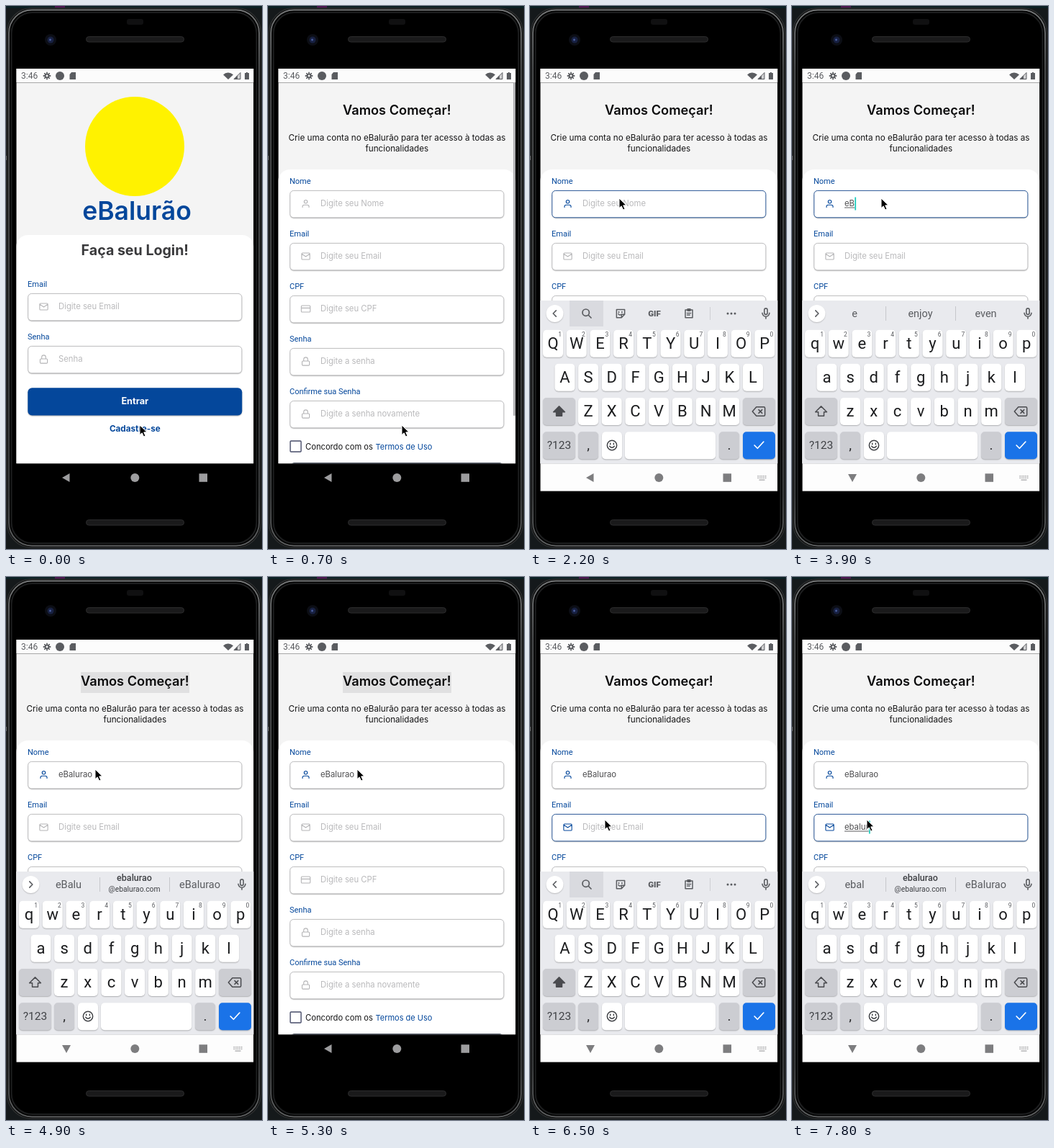
An HTML page with a canvas that plays this animation: 356x754 px, repeating every 8 s.

```html
<!DOCTYPE html>
<html lang="pt-BR">
<head>
<meta charset="utf-8">
<title>Cadastro</title>
<style>
html, body { margin: 0; width: 100%; height: 100%; overflow: hidden; background: #000; }
canvas { display: block; width: 356px; height: 754px; }
</style>
</head>
<body>
<canvas id="stage" width="356" height="754"></canvas>
<script>
const ctx = document.getElementById('stage').getContext('2d');
const LOOP = 8000, STEP = 100;
const BLUE = '#04479b', GREY = '#5a5c60', PALE = '#f4f4f4';
const INTER = 'Inter, sans-serif', ROBOTO = 'Roboto, sans-serif';
const APP = 'eBalurão';

// Screen edges; forms keep a 16 px margin
const LEFT = 14.3, WIDTH = 330, TOP = 106.2, NAV = 635.3, BOTTOM = 673.8, KB_TOP = 409;
const INSET = LEFT + 16, INNER = WIDTH - 32;

const ICONS = {
  user: 'M20 21v-2a4 4 0 0 0-4-4H8a4 4 0 0 0-4 4v2M8 7a4 4 0 1 0 8 0a4 4 0 1 0-8 0',
  mail: 'M4 4h16a2 2 0 0 1 2 2v12a2 2 0 0 1-2 2H4a2 2 0 0 1-2-2V6a2 2 0 0 1 2-2zM22 6l-10 7L2 6',
  card: 'M3 4h18a2 2 0 0 1 2 2v12a2 2 0 0 1-2 2H3a2 2 0 0 1-2-2V6a2 2 0 0 1 2-2zM1 10h22',
  lock: 'M5 11h14a2 2 0 0 1 2 2v7a2 2 0 0 1-2 2H5a2 2 0 0 1-2-2v-7a2 2 0 0 1 2-2zM7 11V7a5 5 0 0 1 10 0v4',
  search: 'M3 10a7 7 0 1 0 14 0a7 7 0 1 0-14 0M21 21l-6-6',
  sticker: 'M3 3h18v11l-7 7H3zM14 21v-7h7M8 8v2M15 8v2M7 13q3 4 6 1',
  clip: 'M4 4h16v17H4zM9 2h6v4H9zM8 11h8M8 15h6',
  smile: 'M2 12a10 10 0 1 0 20 0a10 10 0 1 0-20 0M7 14q5 6 10 0M8.5 8v2M15.5 8v2',
  back: 'M21 4H8l-7 8 7 8h13a2 2 0 0 0 2-2V6a2 2 0 0 0-2-2zM18 9l-6 6M12 9l6 6',
  shift: 'M12 3l-10 10h5v7h10v-7h5z',
  left: 'M15 5l-7 7 7 7',
  right: 'M9 5l7 7-7 7',
  check: 'M21 5L9 18l-6-6',
  mic: 'M9 5a3 3 0 0 1 6 0v6a3 3 0 0 1-6 0zM5 11a7 7 0 0 0 14 0M12 18v4',
  gear: 'M7 12a5 5 0 1 0 10 0a5 5 0 1 0-10 0M12 2v4M12 18v4M2 12h4M18 12h4M5 5l3 3M16 16l3 3M19 5l-3 3M8 16l-3 3'
};
for (const name in ICONS) ICONS[name] = new Path2D(ICONS[name]);

function rect(x, y, w, h, color) {
  ctx.fillStyle = color;
  ctx.fillRect(x, y, w, h);
}

function round(x, y, w, h, r, fill, stroke, lw = 1) {
  ctx.beginPath();
  ctx.roundRect(x, y, w, h, r);
  if (fill) { ctx.fillStyle = fill; ctx.fill(); }
  if (stroke) { ctx.strokeStyle = stroke; ctx.lineWidth = lw; ctx.stroke(); }
}

function disc(x, y, r, color) {
  ctx.beginPath();
  ctx.arc(x, y, r, 0, 7);
  ctx.fillStyle = color;
  ctx.fill();
}

function poly(points, fill, stroke) {
  ctx.beginPath();
  for (let i = 0; i < points.length; i += 2) ctx.lineTo(points[i], points[i + 1]);
  ctx.closePath();
  ctx.fillStyle = fill;
  ctx.fill();
  if (stroke) { ctx.strokeStyle = stroke; ctx.lineWidth = 1; ctx.stroke(); }
}

function text(str, x, y, font, color, align = 'left') {
  ctx.font = font;
  ctx.fillStyle = color;
  ctx.textAlign = align;
  ctx.fillText(str, x, y);
}

function icon(name, x, y, size, color, lw = 1.1, solid) {
  const k = size / 24;
  ctx.save();
  ctx.translate(x - size / 2, y - size / 2);
  ctx.scale(k, k);
  ctx.strokeStyle = ctx.fillStyle = color;
  ctx.lineWidth = lw / k;
  ctx.lineJoin = ctx.lineCap = 'round';
  if (solid) ctx.fill(ICONS[name]);
  ctx.stroke(ICONS[name]);
  ctx.restore();
}

function shaded(alpha, draw) {
  ctx.save();
  ctx.shadowColor = `rgba(0,0,0,${alpha})`;
  ctx.shadowBlur = 1.5;
  ctx.shadowOffsetY = 1;
  draw();
  ctx.restore();
}

function clipped(x, y, w, h, draw) {
  ctx.save();
  ctx.beginPath();
  ctx.rect(x, y, w, h);
  ctx.clip();
  draw();
  ctx.restore();
}

// Timeline
const NAME = { word: 'eBalurao', keys: [2800, 3900, 4300, 4400, 4600, 4750, 4800, 4850], from: 1700, to: 4900 };
const MAIL = { word: 'ebalurao', keys: [6900, 7300, 7400, 7500, 7650, 7800], from: 5900, to: LOOP };
const SUGGEST_LAG = 200, KB_HEIGHT = 265;

const clamp = v => Math.max(0, Math.min(1, v));
const smooth = p => p * p * (3 - 2 * p);
const within = (t, a, b) => t >= a && t < b;
const typed = (input, t) => input.word.slice(0, input.keys.filter(k => k <= t).length);
const focused = (input, t) => within(t, input.from, input.to);

function caretOn(input, t) {
  const last = Math.max(input.from, ...input.keys.filter(k => k <= t));
  return (t - last) % 1000 < 500;
}

function keyboardDrop(t) {
  if (t < 4900) return Math.pow(1 - clamp((t - 1880) / 310), 3);
  if (t < 5900) return smooth(clamp((t - 4900) / 200));
  return Math.pow(1 - clamp((t - 5980) / 310), 3);
}

function pointer(t) {
  const a = smooth(clamp((t - 800) / 500)), b = smooth(clamp((t - 5500) / 200));
  return [186 - 62 * a - 20 * b, 582 - 315 * a + 70 * b];
}

// Phone and system bars
function phone() {
  rect(0, 0, 356, 754, '#15191b');
  rect(0, 0, 356, 3, '#0b2024');
  rect(68, 0, 14, 3, '#4b1550');
  rect(0, 208, 4, 6, '#6b6d6e');
  const rim = ctx.createLinearGradient(0, 0, 0, 754);
  rim.addColorStop(0, '#77797a');
  rim.addColorStop(.12, '#4c4e4f');
  rim.addColorStop(.9, '#3e4041');
  rim.addColorStop(1, '#5e6061');
  round(1.5, 3, 353, 749, 34, '#060606', '#2c2e2f', 1.5);
  round(4, 5.5, 348, 744, 32, '#000', rim, 2);
  round(7.5, 9, 341, 737, 29, '#000', '#1d1e1f', 2);
  round(168, 18, 23, 8, 3, '#101011');
  disc(62, 47, 8, '#0c0e15');
  disc(62, 47, 4.5, '#182142');
  disc(61.5, 47, 1.4, '#4a5fa0');
  for (const y of [42, 713]) round(111.5, y + .5, 136, 7.5, 4, '#1a1a1b', '#2c2c2d');
}

function statusBar() {
  rect(LEFT, 87, WIDTH, TOP - 87, '#fcfcfc');
  text('3:46', 21, 101, '12px ' + ROBOTO, GREY);
  icon('gear', 57, 97, 11, GREY, 1.8);
  disc(75, 97, 6, GREY);
  poly([91, 92, 97, 92, 97, 102, 88.5, 102, 88.5, 95], GREY);
  ctx.beginPath();
  ctx.moveTo(309, 102);
  ctx.arc(309, 102, 9.5, -Math.PI * .76, -Math.PI * .24);
  ctx.fillStyle = GREY;
  ctx.fill();
  poly([317, 101.5, 326, 101.5, 326, 92.5], '#d0d0d2', GREY);
  poly([317, 101.5, 322, 101.5, 322, 96.5], GREY);
  rect(332, 93, 6, 9, GREY);
  rect(334, 92, 2, 1, GREY);
}

function navIcons(color, down) {
  poly(down ? [78, 650, 90, 650, 84, 661] : [78, 655, 88.5, 649, 88.5, 661], color);
  disc(179.3, 655, 6, color);
  rect(268.5, 649.3, 11.5, 11.5, color);
}

// Forms
function field(top, label, hint, glyph, input, t) {
  const active = input && focused(input, t);
  const value = input ? typed(input, t) : '';
  const box = [INSET + .4, top + .4, INNER - .8, 37.4, 5];
  text(label, 30, top - 9, '11px ' + ROBOTO, BLUE);
  shaded(.35, () => round(...box, '#fff'));
  round(...box, '#fff', active ? '#2a5796' : '#bcbcbe');
  icon(glyph, 52.5, top + 18.5, 13.5, active || value ? BLUE : '#b4b4b6');
  text(value || hint, 73, top + 22, '11.3px ' + INTER, value ? '#4c4c4e' : '#b9b9bb');
  if (!active) return;
  const end = 73 + (value ? ctx.measureText(value).width : 0);
  if (value) rect(73, top + 23.5, end - 73, 1, '#5c5c5e');
  if (caretOn(input, t)) rect(end + .3, top + 9.5, 1.8, 18, '#1fcbbd');
}

function button(y, label) {
  shaded(.3, () => round(INSET, y, INNER, 38.4, 6, BLUE));
  text(label, 179.3, y + 22.3, '700 12.7px ' + INTER, '#fff', 'center');
}

function login(pressed) {
  rect(LEFT, TOP, WIDTH, NAV - TOP, PALE);
  round(LEFT, 318, WIDTH, 340, 16, '#fff');
  disc(179, 195, 69, '#fff200');
  text(APP, 182, 297, '600 35.5px ' + INTER, BLUE, 'center');
  text('Faça seu Login!', 179.3, 346, '700 19.6px ' + INTER, '#3a3a3c', 'center');
  field(399, 'Email', 'Digite seu Email', 'mail');
  field(472, 'Senha', 'Senha', 'lock');
  button(530.2, 'Entrar');
  ctx.globalAlpha = pressed ? .3 : 1;
  text('Cadastre-se', 179.3, 591, '700 11.7px ' + INTER, BLUE, 'center');
  ctx.globalAlpha = 1;
}

function signup(t) {
  rect(LEFT, TOP, WIDTH, NAV - TOP, PALE);
  round(LEFT, 227, WIDTH, 440, 16, '#fff');
  if (within(t, 4900, 5700)) rect(104, 132, 151, 29, '#e0e0e1');
  text('Vamos Começar!', 179.3, 151.3, '600 18.2px ' + INTER, '#0b0b0c', 'center');
  const font = '11.7px ' + INTER;
  text(`Crie uma conta no ${APP} para ter acesso à todas as`, 179.5, 187, font, '#151516', 'center');
  text('funcionalidades', 179.3, 202, font, '#151516', 'center');
  field(256, 'Nome', 'Digite seu Nome', 'user', NAME, t);
  field(329, 'Email', 'Digite seu Email', 'mail', MAIL, t);
  field(402, 'CPF', 'Digite seu CPF', 'card');
  field(475, 'Senha', 'Digite a senha', 'lock');
  field(548, 'Confirme sua Senha', 'Digite a senha novamente', 'lock');
  round(31, 604, 15, 15, 1, '#fff', '#454b68', 1.4);
  text('Concordo com os', 52, 615.5, '11.2px ' + INTER, '#151516');
  text('Termos de Uso', 149.5, 615.5, '11px ' + INTER, BLUE);
  round(INSET, 634.3, INNER, 38.4, 6, '#0c1626');
  if (t < 1800) round(341, 106, 3, 463, 1, '#b5b5b7');
}

// Keyboard
function key(x, y, w, label, color, ink, size) {
  shaded(.25, () => round(x, y, w, 38, 5, color));
  if (label) text(label, x + w / 2, y + 26 - (22 - size) * .35, size + 'px ' + ROBOTO, ink, 'center');
}

function letters(upper) {
  const rows = [['qwertyuiop', 18], ['asdfghjkl', 34.4], ['zxcvbnm', 67]];
  rows.forEach(([row, x0], r) => [...row].forEach((c, i) => {
    const x = x0 + i * 32.7, y = 449.7 + r * 47.1;
    key(x, y, 28, upper ? c.toUpperCase() : c, '#fff', '#1b1c1e', 22);
    if (!r) text((i + 1) % 10, x + 26, y + 9, '8.5px ' + ROBOTO, GREY, 'right');
  }));
}

function toolbar() {
  rect(55, KB_TOP, 47, 36, '#d9dadf');
  icon('search', 79, 427, 16, GREY, 1.7);
  icon('sticker', 126, 427, 15, GREY, 1.5);
  text('GIF', 173, 431, '900 11.5px ' + ROBOTO, GREY, 'center');
  icon('clip', 221, 427, 15, GREY, 1.5);
  rect(250, 418, 1, 18, '#cfd0d4');
  for (const x of [275, 280, 285]) disc(x, 427, 1.5, GREY);
}

function suggestions(word) {
  const font = '14.5px ' + ROBOTO;
  const known = word.length > 2;
  text(word, 87, 432, font, GREY, 'center');
  if (known) {
    text(MAIL.word, 178.5, 422, '500 12.5px ' + ROBOTO, '#3f4145', 'center');
    text(`@${MAIL.word}.com`, 178.5, 437, '10.3px ' + ROBOTO, '#3f4145', 'center');
  } else {
    text('enjoy', 178.5, 432, font, GREY, 'center');
  }
  text(known ? NAME.word : 'even', 269.5, 432, font, GREY, 'center');
  for (const x of [130, 227]) rect(x, 417, 1, 20, '#c6c7cb');
}

function keyboard(t) {
  const input = t < 5900 ? NAME : MAIL;
  const hint = typed(input, t - SUGGEST_LAG);
  const upper = !typed(input, t) || within(t, 3300, 3900);
  const grey = '#cccdd2', low = 544, base = 591.2;
  rect(LEFT, KB_TOP, WIDTH, NAV - KB_TOP, '#e9eaee');
  rect(LEFT, NAV, WIDTH, BOTTOM - NAV, '#fdfdfd');
  if (hint) suggestions(hint); else toolbar();
  shaded(.2, () => disc(34.5, 427, 12, '#fff'));
  icon(hint ? 'right' : 'left', 34.5, 427, 14, GREY, 1.6);
  icon('mic', 328, 427, 17, GREY, 1.6);
  letters(upper);
  key(18, low, 45, '', grey);
  icon('shift', 40.5, 563, 19, '#4a4b4f', 1.5, upper);
  key(296, low, 45, '', grey);
  icon('back', 318, 563, 19, '#4a4b4f', 1.5);
  key(18, base, 45, '?123', grey, '#3f4145', 15.5);
  key(67, base, 28, ',', grey, '#2b2c2e', 19);
  key(100, base, 28, '', '#fff');
  icon('smile', 114, 610, 16, '#3f4145', 1.5);
  key(132, base, 126, '', '#fff');
  key(263, base, 28, '.', grey, '#2b2c2e', 19);
  key(296, base, 45, '', '#1a73e8');
  icon('check', 318.5, 610, 17, '#fff', 1.7);
  for (let i = 0; i < 10; i++) rect(316.5 + i % 5 * 2.6, 652 + (i / 5 | 0) * 2.6, 1.5, 1.5, '#a2a2a4');
  rect(318.5, 657.5, 8, 1.2, '#a2a2a4');
}

function scene(t) {
  phone();
  statusBar();
  const enter = smooth(clamp((t - 400) / 300));
  const resized = within(t, 1800, 5000) || t >= 6000;
  clipped(LEFT, TOP, WIDTH, NAV - TOP, () => {
    if (enter < 1) login(within(t, 400, 600));
    if (enter > 0) {
      ctx.translate(0, (1 - enter) * 40);
      ctx.globalAlpha = enter;
      signup(t);
    }
  });
  if (resized) rect(LEFT, KB_TOP, WIDTH, NAV - KB_TOP, '#fbfbfb');

  const drop = keyboardDrop(t);
  if (drop < 1) {
    clipped(LEFT, TOP, WIDTH, BOTTOM - TOP, () => {
      ctx.translate(0, drop * KB_HEIGHT);
      keyboard(t);
    });
    if (drop > 0) rect(LEFT, NAV, WIDTH, BOTTOM - NAV, 'rgba(0,0,0,.16)');
  }
  const down = within(t, 2300, 5200) || t >= 6400;
  navIcons(drop > 0 ? '#9d9d9f' : '#7d7d7f', down);

  const [x, y] = pointer(t);
  poly([0, 0, 0, 13.5, 3.2, 10.8, 5.6, 16, 8, 15, 5.7, 9.9, 10, 9.7].map((v, i) => v + (i % 2 ? y : x)),
    '#000', '#fff');
}

function frame() {
  const t = performance.now() % LOOP;
  scene(Math.floor(t / STEP) * STEP);
  requestAnimationFrame(frame);
}
frame();
</script>
</body>
</html>
```
